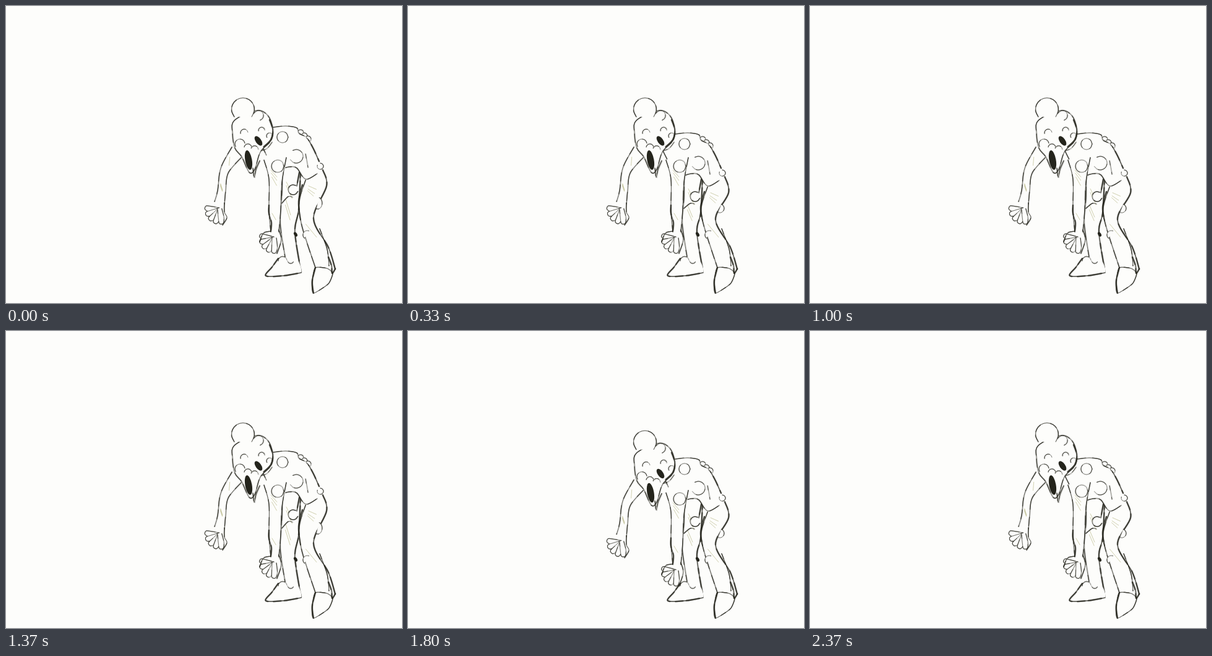
An HTML page for the animation above (2400 ms loop, 640 by 480 pixels).

```html
<!DOCTYPE html>
<html lang="en">
<head>
<meta charset="utf-8">
<title>Slouching sketch</title>
<style>
html, body { margin: 0; width: 100%; height: 100%; overflow: hidden; background: #fdfdfb; }
svg { display: block; width: 100vw; height: 100vh; }
path { stroke-linecap: round; stroke-linejoin: round; }
</style>
</head>
<body>
<svg id="stage" viewBox="0 0 640 480"></svg>
<script>
const PAPER = '#fdfdfb', INK = '#24241c', FAINT = '#b9b98a';
const LIGHT = 0.8, MID = 1.1, HEAVY = 1.7;
const stage = document.getElementById('stage');

// Four drawings, each held for HOLD ms, make one breath.
const HOLD = 300;
const poses = [
  { body: -11, front: 0 },
  { body: 0, front: 0 },
  { body: 0, front: 12.5 },
  { body: 0, front: 0 }
];

// How far a point at height y moves in a pose; the legs bend above the knee.
const moveFront = pose => () => pose.front;
const moveBody = pose => () => pose.body;
const moveLegs = pose => y => pose.body * Math.max(0, Math.min(1, (350 - y) / 30));

// Seeded random numbers, restarted for every drawing so that lines hold still.
let seed = 1;
function random() {
  seed = seed * 16807 % 2147483647;
  return seed / 2147483647;
}
const between = (a, b) => a + (b - a) * random();
const mix = (a, b, t) => a.map((v, i) => v + (b[i] - v) * t);
const points = text => text.split(' ').map(s => s.split(',').map(Number));

// Smooth path through a few points.
function curve(pts, lift, closed = false, bend = 1 / 6) {
  const n = pts.length;
  const at = i => {
    const [x, y] = pts[closed ? (i + n) % n : Math.max(0, Math.min(n - 1, i))];
    return [x, y + lift(y)];
  };
  let d = 'M' + at(0);
  for (let i = 0; i < (closed ? n : n - 1); i++) {
    const [a, b, c, e] = [-1, 0, 1, 2].map(k => at(i + k));
    const h1 = b.map((v, k) => v + (c[k] - a[k]) * bend);
    const h2 = c.map((v, k) => v - (e[k] - b[k]) * bend);
    d += `C${h1} ${h2} ${c}`;
  }
  return d;
}

const fill = (d, color = PAPER) => `<path d="${d}" fill="${color}"/>`;
const stroke = (d, color, width, alpha, extra = '') =>
  `<path d="${d}" fill="none" stroke="${color}" stroke-width="${width}" opacity="${alpha}" ${extra}/>`;

// A thin line, a shaky repeat beside it and patches of harder pressure.
function pencil(d, weight) {
  const shake = `transform="translate(${between(-1.2, 1.2)} ${between(-1, 1)})"`;
  const press = `stroke-dasharray="${[12, 9, 20, 14].map(v => v * between(0.6, 1.4))}"`;
  return stroke(d, INK, weight, 0.65) +
    stroke(d, INK, weight * 0.7, 0.3, shake) +
    stroke(d, INK, weight * 1.5, 0.6, press);
}

// Marks: each returns a function of the lift.
const line = (text, weight = MID) => lift => pencil(curve(points(text), lift), weight);

const solid = (text, weight = MID, bend) => lift => {
  const d = curve(points(text), lift, true, bend);
  return fill(d) + (weight ? pencil(d, weight) : '');
};

function limb(leftText, rightText, leftWeight, rightWeight) {
  const left = points(leftText), right = points(rightText);
  const along = (pts, t) => {
    const f = t * (pts.length - 1), i = Math.min(pts.length - 2, Math.floor(f));
    return mix(pts[i], pts[i + 1], f - i);
  };
  const across = (t, s) => mix(along(left, t), along(right, t), s);
  return lift => {
    let out = fill(curve([...left, ...[...right].reverse()], lift, true, 0.1));
    for (let i = 0; i < 4; i++) {
      const t = between(0.1, 0.8);
      out += stroke(curve([across(t, 0.25), across(t + 0.1, 0.6)], lift), FAINT, 1, 0.7);
    }
    return out + pencil(curve(left, lift), leftWeight) + pencil(curve(right, lift), rightWeight);
  };
}

// Part of a circle, angles in degrees clockwise from the right.
const bump = (x, y, r, from = 0, to = 360, weight = LIGHT) => lift => {
  const pts = Array.from({ length: 9 }, (_, i) => {
    const a = (from + (to - from) * i / 8) * Math.PI / 180;
    return [x + r * Math.cos(a), y + r * Math.sin(a)];
  });
  const d = curve(pts, lift);
  return fill(d) + pencil(d, weight);
};

const blot = (x, y, rx, ry, turn) => lift =>
  `<ellipse rx="${rx}" ry="${ry}" fill="${INK}" transform="translate(${x} ${y + lift(y)}) rotate(${turn})"/>`;

// Curled fingers fanned around the knuckles.
const hand = (x, y, from, to) => lift => {
  let out = '';
  for (let i = 0; i < 5; i++) {
    const turn = from + (to - from) * i / 4;
    const finger = points('-1,-4 14,-5 23,-2 22,4 13,4 0,3');
    const d = curve(finger, () => 0);
    out += `<g transform="translate(${x} ${y + lift(y)}) rotate(${turn})">${fill(d)}${pencil(d, LIGHT)}</g>`;
  }
  return out;
};

const farArm = [
  limb('365,228 347,262 342,298 337,316', '380,245 359,270 355,298 353,320', MID, MID),
  hand(345, 329, 185, 80),
  line('353,318 353,333 357,342 350,354', MID)
];

const farLeg = [
  limb('446,275 446,310 443,350 451,406', '476,280 473,335 467,365 477,430', MID, HEAVY),
  bump(464, 308, 8, 20, 300, MID),
  line('474,280 470,302', HEAVY),
  line('446,327 456,319 463,320'),
  blot(468, 369, 4, 2.5, 60),
  solid('440,408 430,424 420,436 448,436 477,431 473,414 452,406', 0, 0.08),
  line('440,408 430,422 420,436 448,436 477,431', HEAVY),
  bump(447, 412, 7, 180, 350),
  bump(460, 411, 5, 30, 170)
];

const nearLeg = [
  limb('485,290 474,325 478,355 500,423', '512,276 518,302 497,345 521,390 532,425', MID, HEAVY),
  line('479,300 473,325 476,347', HEAVY),
  line('507,360 519,393 522,420'),
  bump(504, 327, 7, -70, 110),
  bump(487, 370, 7, 130, 290),
  solid('500,423 495,445 497,464 521,449 528,432 519,424', MID, 0.1),
  line('500,423 495,445 497,464', HEAVY),
  line('521,406 526,420 527,432 532,425', HEAVY)
];

const torso = [
  solid('432,207 470,208 492,228 506,262 508,276 484,292 470,273 446,273 420,258 412,234', 0),
  line('432,207 452,205 470,208 474,217 486,222'),
  line('486,222 497,242 506,262', HEAVY),
  ...[0, 1, 2].map(i => bump(476 + 6 * i, 216 + 5 * i, 5, -130, 40)),
  bump(508, 270, 5, -90, 200),
  line('447,274 458,271 470,273 484,291 503,282'),
  line('412,234 421,252'),
  line('484,250 488,272', LIGHT),
  bump(447, 223, 9),
  bump(469, 254, 11, -120, 150)
];

const nearArm = [
  limb('417,249 425,280 425,330 428,365', '453,245 446,285 444,330 441,365', MID, MID),
  line('425,322 425,335 429,350 428,364', HEAVY),
  bump(439, 259, 10),
  hand(433, 376, 190, 88),
  line('428,364 416,367 410,381'),
  line('441,362 445,378 438,400')
];

const head = [
  solid('369,185 366,206 370,230 381,244 393,269 402,264 411,236 428,218 431,200 423,177 404,169'),
  line('426,184 431,200 428,216 416,228', HEAVY),
  bump(383, 167, 18.5, 140, 400, MID),
  bump(408, 177, 8, 210, 430),
  bump(385, 205, 6, 170, 350),
  bump(378, 223, 8, 150, 350),
  bump(413, 201, 5, 170, 360),
  bump(426, 210, 5, 150, 300),
  bump(391, 229, 6, 190, 340),
  bump(402, 232, 6, 200, 360),
  blot(408, 218, 9, 4.5, 55),
  blot(392, 249, 16, 5.5, 80),
  line('399,262 401,277 404,264 410,250'),
  line('412,234 422,230 430,220', LIGHT)
];

const figure = [
  [farArm, moveFront], [farLeg, moveLegs], [nearLeg, moveLegs],
  [torso, moveBody], [nearArm, moveFront], [head, moveFront]
];

function render(pose) {
  seed = 4711;
  stage.innerHTML = figure.map(([marks, move]) => marks.map(mark => mark(move(pose))).join('')).join('');
}

let shown = -1;
function tick() {
  const i = Math.floor(performance.now() / HOLD) % poses.length;
  if (i !== shown) render(poses[shown = i]);
  requestAnimationFrame(tick);
}
tick();
</script>
</body>
</html>
```
